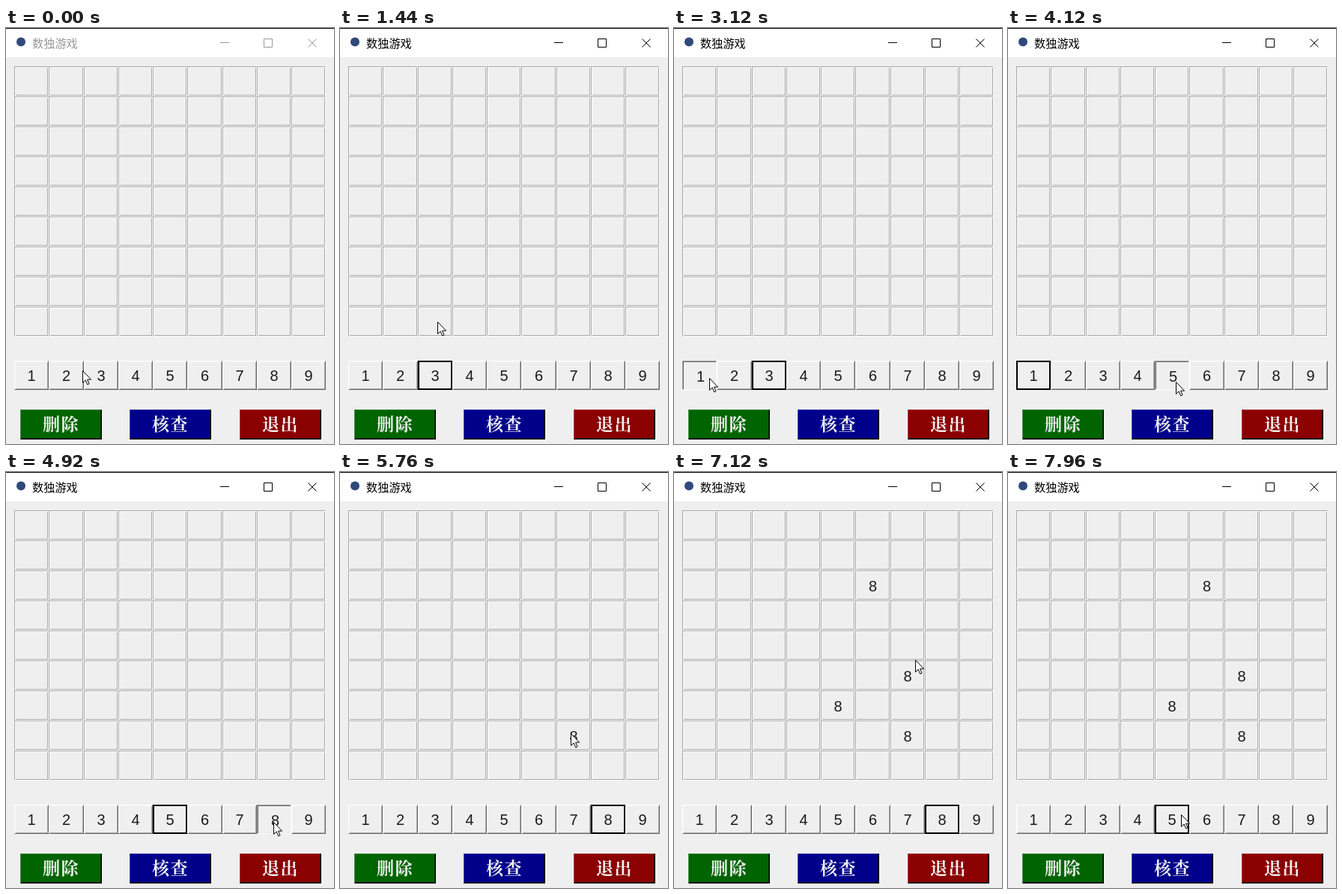
Write an HTML page that moves like this. It is 438 px wide and 554 px high and loops after 8 s.

```html
<!DOCTYPE html>
<html lang="zh">
<head>
<meta charset="utf-8">
<style>
html, body { margin: 0; width: 100%; height: 100%; overflow: hidden; background: #efefef; }
#win { position: absolute; left: 0; top: 0; width: 438px; height: 554px; overflow: hidden; }
#bar { position: absolute; width: 438px; height: 39px; box-sizing: border-box; border-top: 1px solid #000; background: #fff; color: #999; }
#bar.on { color: #000; }
#bar span { position: absolute; left: 35px; top: 7px; font: 15.2px/22px "Noto Sans CJK SC", "Noto Sans CJK", sans-serif; white-space: nowrap; }
svg { position: absolute; left: 0; top: 0; overflow: visible; }
#bar svg { top: -1px; }
.box { position: absolute; box-sizing: border-box; border: 1px solid; text-align: center; color: #1c1c1c; font: 20px "Liberation Sans", Arial, sans-serif; }
.cell { border-color: #a6a6a6 #fff #fff #a6a6a6; box-shadow: inset 1px 1px #fbfbfb, inset -1px -1px #a6a6a6; line-height: 40px; }
.num { border-color: #fff #696969 #696969 #fff; box-shadow: inset 1px 1px #f4f4f4, inset -1px -1px #a8a8a8; line-height: 39px; }
.num.down { border-color: #a0a0a0 #fff #fff #a0a0a0; box-shadow: inset 1px 1px #696969, inset -1px -1px #e8e8e8; line-height: 41px; text-indent: 3px; }
.num.sel { border-color: #000; box-shadow: inset 0 0 0 1px #000; }
.act {
  --light: color-mix(in srgb, var(--face), #fff 25%);
  background: var(--face); border-color: var(--light) #000 #000 var(--light);
  box-shadow: inset -1px -1px color-mix(in srgb, var(--face), #000 60%);
  color: #f0f0f0; letter-spacing: 1.5px;
  font: bold 23px/36px "Noto Serif CJK SC", "Noto Sans CJK SC", "Noto Sans CJK", serif;
}
</style>
</head>
<body>
<div id="win">
  <div id="bar">
    <svg width="438" height="39" fill="none" stroke="currentColor">
      <circle cx="20" cy="18.5" r="6" fill="#2f4a7a" stroke="none"/>
      <path d="M286 19.5h12M344.5 14.5h11v11h-11zM403.5 14.5l11 11m0 -11l-11 11"/>
    </svg>
    <span>数独游戏</span>
  </div>
</div>
<script>
const LOOP = 8000, STEP = 40, MOVE = 480, HOLD = 120;
const LEFT = 11, TOP = 51, COL = 46.25, ROW = 40, PAD = 443;
const win = document.getElementById('win'), bar = document.getElementById('bar');

function box(cls, x, y, w, h, text = '') {
  const el = document.createElement('div');
  el.className = 'box ' + cls;
  el.style.cssText = `left:${x}px;top:${y}px;width:${w}px;height:${h}px`;
  el.textContent = text;
  return win.appendChild(el);
}

function row(cls, y, h, label) {
  const edge = k => Math.round(LEFT + COL * k);
  return Array.from({ length: 9 }, (_, k) => box(cls, edge(k), y, edge(k + 1) - edge(k), h, label(k)));
}

const cells = Array.from({ length: 9 }, (_, r) => row('cell', TOP + ROW * r, ROW, () => ''));
const nums = row('num', PAD, 39, k => k + 1);

[['删除', '#006400'], ['核查', '#00008b'], ['退出', '#8b0000']].forEach(([label, face], i) =>
  box('act', Math.round(18.6 + 146.5 * i), 508, 109, 40, label).style.setProperty('--face', face));

win.insertAdjacentHTML('beforeend', `<svg id="cur" width="14" height="22">
  <path d="M.5 .5V16.4L4.2 12.9L6.7 18.8L9 17.8L6.6 12.1H11.6Z" fill="#fff" stroke="#000"/></svg>`);
const cur = document.getElementById('cur');

// pointer stops: arrival, x, y and, for a click, the pause before it
const stops = [
  [0, 102, 456], [200, 126, 461, 240], [1800, 150, 12], [2200, 126, 461],
  [3040, 47, 466, 40], [4040, 224, 471, 40], [4800, 357, 466, 40],
  [5600, 308, 348, 40], [5920, 216, 309, 40], [6360, 262, 61], [6520, 262, 150, 40],
  [6880, 306, 266, 40], [7120, 322, 250], [7280, 349, 266], [7640, 231, 456, 160]
].map(([at, x, y, wait]) => ({ at, x, y, press: wait ? at + wait : Infinity }));

function pointer(t) {
  const i = stops.findIndex(s => s.at > t);
  if (i < 0) return stops[stops.length - 1];
  const a = stops[i - 1], b = stops[i];
  const free = a.press < Infinity ? a.press + HOLD : a.at;
  const from = Math.max(free, b.at - MOVE);
  const u = Math.max(0, (t - from) / (b.at - from)), e = u * u * (3 - 2 * u);
  return { x: Math.round(a.x + (b.x - a.x) * e), y: Math.round(a.y + (b.y - a.y) * e) };
}

function draw(now) {
  const t = Math.floor(now % LOOP / STEP) * STEP;
  const done = stops.filter(s => s.press <= t);
  let down = 0, sel = 0;
  cells.flat().forEach(el => el.textContent = '');

  // a click on the pad picks a number, a click on the grid enters it
  for (const { x, y, press } of done) {
    const c = Math.floor((x - LEFT) / COL);
    if (y < PAD) cells[Math.floor((y - TOP) / ROW)][c].textContent = sel;
    else if (t < press + HOLD) down = c + 1;
    else sel = c + 1;
  }
  bar.className = done.length ? 'on' : '';
  nums.forEach((el, i) => {
    el.className = 'box num' + (down === i + 1 ? ' down' : sel === i + 1 ? ' sel' : '');
  });
  const { x, y } = pointer(t);
  cur.style.transform = `translate(${x}px,${y}px)`;
}

const start = performance.now();
function tick() {
  draw(performance.now() - start);
  requestAnimationFrame(tick);
}
tick();
</script>
</body>
</html>
```
